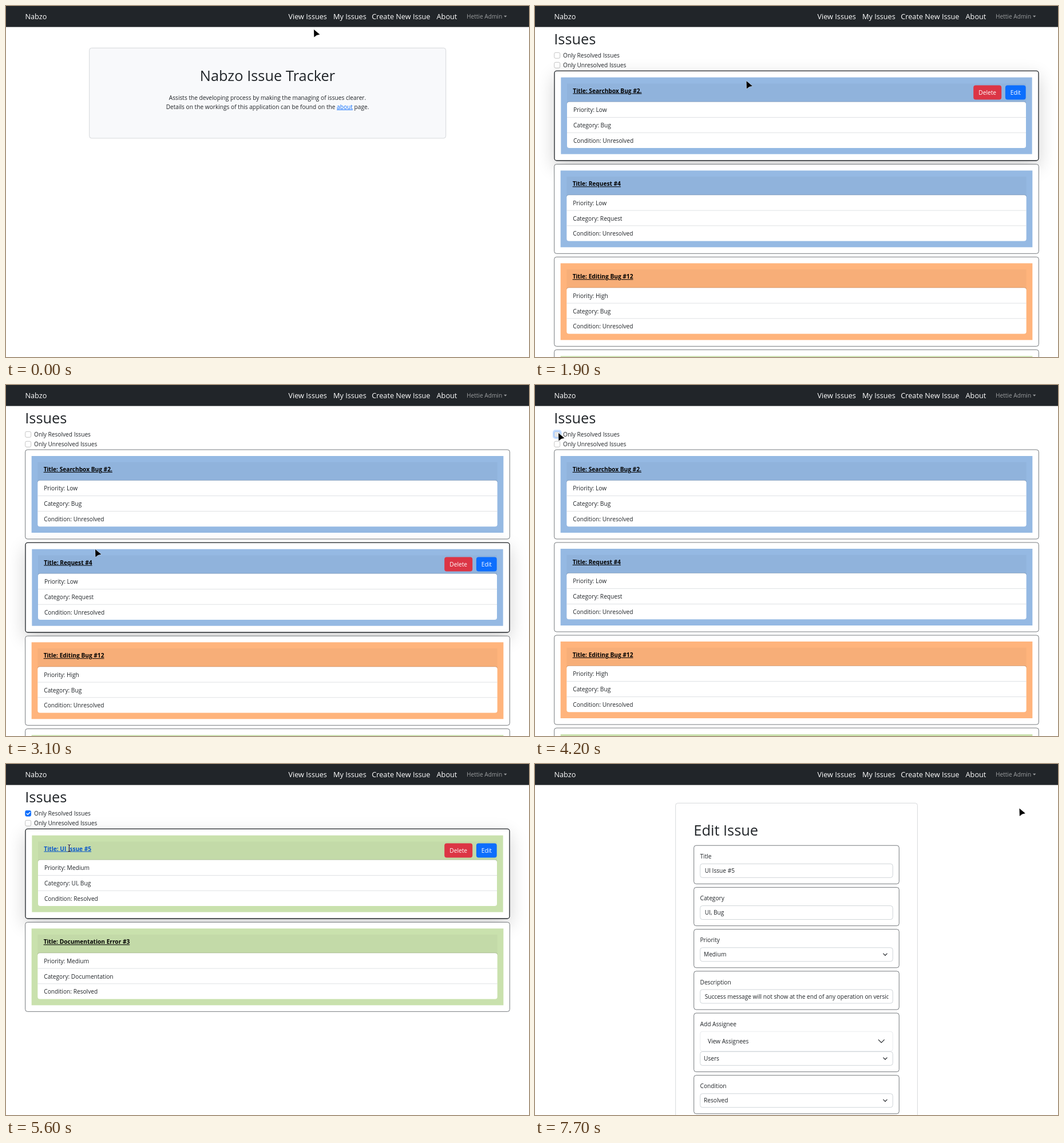
Animation of 914x613 px, one loop 8 s. Source, as an HTML page:

```html
<!DOCTYPE html>
<html lang="en">
<head>
<meta charset="utf-8">
<title>Issue tracker walkthrough</title>
<style>
  html, body { margin: 0; width: 100%; height: 100%; overflow: hidden; background: #fff; }
  svg { display: block; width: 914px; height: 613px; font-family: "Open Sans", "Noto Sans", sans-serif; }
  text { white-space: pre; }
</style>
</head>
<body>
<svg id="stage" viewBox="0 0 914 613" xmlns="http://www.w3.org/2000/svg"></svg>
<script>
const LOOP = 8000, STEP = 100;
const BODY = 10.17, NAV = 12.7, HEAD = 25.4;
const INK = '#212529', BLUE = '#0d6efd', EDGE = '#343a40', LINE = '#dee2e6';
const TINT = { Low: '#95b9e3', Medium: '#c9e1ad', High: '#ffb47c' };
const LEFT = 33.33, RIGHT = 880.67, FIRST = 112.67, PITCH = 162, ROW = 26.8;

const BRAND = 'Nabzo', USER = 'Hettie Admin';
const DEVS = ['Eric Dev', 'Bernard Dev'];
const MAILS = ['eric@dev.test', 'bernard@dev.test'];
const NOTE = 'Success message will not show at the end of any operation on version 1.2.9.';

const issue = (title, priority, category, condition) => ({ title, priority, category, condition });
const ISSUES = [
  issue('Searchbox Bug #2.', 'Low', 'Bug', 'Unresolved'),
  issue('Request #4', 'Low', 'Request', 'Unresolved'),
  issue('Editing Bug #12', 'High', 'Bug', 'Unresolved'),
  issue('UI Issue #5', 'Medium', 'UI, Bug', 'Resolved'),
  issue('Documentation Error #3', 'Medium', 'Documentation', 'Resolved')
];

// Pointer travel: start, end, from, to, easing, optional bend point
const smooth = u => u * u * (3 - 2 * u);
const settle = u => 1 - (1 - u) ** 2;
const linear = u => u;
const MOVES = [
  [200, 900, [538, 41], [537.5, 20], smooth],
  [1050, 1900, [537.5, 20], [369.5, 131], smooth],
  [1900, 2800, [369.5, 131], [185, 452], smooth, [300, 350]],
  [2900, 3100, [185, 452], [156, 287], linear],
  [3100, 3800, [156, 287], [42.5, 85], settle],
  [3800, 3900, [42.5, 85], [41, 84], linear],
  [4600, 5600, [41, 84], [110.5, 147], smooth],
  [6100, 7000, [110.5, 147], [799.5, 180.5], smooth, [480, 392]],
  [7000, 7600, [799.5, 180.5], [846.5, 77.5], smooth]
];

function pointerAt(t) {
  let pos = MOVES[0][2];
  for (const [t0, t1, a, b, ease, bend] of MOVES) {
    if (t < t0) break;
    const u = ease(Math.min(1, (t - t0) / (t1 - t0)));
    const c = bend || a.map((v, i) => (v + b[i]) / 2);
    pos = a.map((v, i) => (1 - u) ** 2 * v + 2 * u * (1 - u) * c[i] + u * u * b[i]);
  }
  return pos;
}

let mx, my, cursor;

const inside = (x, y, w, h) => mx >= x && mx <= x + w && my >= y && my <= y + h;
const attrs = o => Object.entries(o).map(([k, v]) => ` ${k}="${v}"`).join('');
const rect = (x, y, w, h, fill, more = {}) => `<rect${attrs({ x, y, width: w, height: h, fill, ...more })}/>`;
const path = (d, more) => `<path${attrs({ d, ...more })}/>`;
const text = (x, y, str, more = {}) => `<text${attrs({ x, y, 'font-size': BODY, fill: INK, ...more })}>${str}</text>`;
const heading = (x, y, str, more = {}) => text(x, y, str, { 'font-size': HEAD, 'font-weight': 500, ...more });

// Border drawn inside the box, like a CSS border
const frame = (x, y, w, h, stroke, line = .67, fill = '#fff') =>
  rect(x + line / 2, y + line / 2, w - line, h - line, fill, { rx: 4, stroke, 'stroke-width': line });

function selectable(x, y, str, more) {
  if (inside(x, y - 10, str.length * 4.9, 13)) cursor = 'beam';
  return text(x, y, str, more);
}

function button(x, y, w, label, fill, hoverFill) {
  const over = inside(x, y, w, 25);
  if (over) cursor = 'hand';
  return rect(x, y, w, 25, over ? hoverFill : fill, { rx: 4 }) +
    text(x + w / 2, y + 16.3, label, { fill: '#fff', 'text-anchor': 'middle' });
}

const buttons = (x, y) =>
  button(x, y, 49, 'Delete', '#dc3545', '#bb2d3b') +
  button(x + 55.7, y, 35.8, 'Edit', BLUE, '#0b5ed7');

function navbar() {
  const links = [[493.5, 'View Issues'], [572, 'My Issues'], [639.3, 'Create New Issue'], [752.6, 'About']];
  const white = { 'font-size': NAV, fill: '#fff' };
  return rect(0, 0, 914, 36.67, INK) +
    text(33.5, 23.3, BRAND, white) +
    links.map(([x, s]) => text(x, 23.3, s, white)).join('') +
    text(805, 22, USER, { fill: '#9b9d9f' }) +
    path('M870 16.8h5.4l-2.7 2.9z', { fill: '#9b9d9f' });
}

function statusBar() {
  if (!inside(488, 6, 79, 31)) return '';
  cursor = 'hand';
  return rect(-1, 598.5, 108, 16, '#dee1e6', { rx: 2.5, stroke: '#c4c7cc', 'stroke-width': .7 }) +
    text(5, 609, 'localhost:3000/issues', { 'font-size': 8.2, fill: '#4b4f54' });
}

function homePage() {
  const mid = { 'text-anchor': 'middle' };
  return frame(145.33, 73, 623.67, 158.3, '#c4c6c9', .67, '#f8f9fb') +
    heading(457, 131, BRAND + ' Issue Tracker', mid) +
    text(457, 164, 'Assists the developing process by making the managing of issues clearer.', mid) +
    text(457, 179.7, 'Details on the workings of this application can be found on the ' +
      `<tspan fill="${BLUE}" text-decoration="underline">about</tspan> page.`, mid);
}

function checkbox(y, label, state) {
  const pressed = state === 'pressed', checked = state === 'checked';
  const fill = checked ? BLUE : pressed ? '#e6e6e6' : '#fff';
  const stroke = checked ? BLUE : pressed ? '#86b7fe' : '#aaa';
  return (pressed ? rect(31, y - 2.67, 15.6, 15.6, BLUE, { rx: 4.5, opacity: .25 }) : '') +
    rect(33.67, y + .33, 10, 10, fill, { rx: 2.4, stroke, 'stroke-width': .67 }) +
    (checked ? path(`M36.2 ${y + 5.4}l1.9 1.9 3.7-3.7`,
      { fill: 'none', stroke: '#fff', 'stroke-width': 1.4, 'stroke-linecap': 'round', 'stroke-linejoin': 'round' }) : '') +
    text(49, y + 9, label);
}

function card(item, top, over) {
  const line = over ? 1.33 : .67, d = line - .67;
  const h = 156.67 + 2 * d, y = top + d, x = LEFT + d, w = RIGHT - LEFT;
  const title = 'Title: ' + item.title;
  const linked = inside(x + 32, y + 29, title.length * 4.9, 13);
  const rows = ['Priority: ' + item.priority, 'Category: ' + item.category, 'Condition: ' + item.condition];
  let out = over ? rect(LEFT, top + 10.67, w, h, '#000', { rx: 4, opacity: .175, filter: 'url(#blur)' }) : '';
  out += frame(LEFT, top, w, h, over ? INK : EDGE, line) +
    rect(x + 11.33, y + 11.33, w - 22.66 - 2 * d, 134, TINT[item.priority]) +
    rect(x + 22, y + 22, w - 44 - 2 * d, 36, '#000', { opacity: .03 }) +
    rect(x + 22, y + 53.4, w - 44 - 2 * d, 5, '#000', { opacity: .175, rx: 4 }) +
    rect(x + 22, y + 54.2, w - 44 - 2 * d, 80.4, '#fff', { rx: 4 }) +
    selectable(x + 32.3, y + 38.2, title,
      { 'font-weight': 700, fill: linked ? '#0a58ca' : '#000', 'text-decoration': 'underline' });
  rows.forEach((s, i) => {
    if (i) out += rect(x + 22, y + 53.9 + i * ROW, w - 44 - 2 * d, .67, '#cfd3d7');
    out += selectable(x + 32.9, y + 71.8 + i * ROW, s);
  });
  return out + (over ? buttons(766.2, y + 25.2) : '');
}

function listPage(t) {
  const filtered = t >= 4300;
  const items = filtered ? ISSUES.slice(3) : ISSUES.slice(0, 4);
  const state = filtered ? 'checked' : t >= 4100 ? 'pressed' : '';
  let top = FIRST;
  let out = heading(33.2, 67.3, 'Issues') +
    checkbox(81, 'Only Resolved Issues', state) + checkbox(98, 'Only Unresolved Issues', '');
  items.forEach((item, i) => {
    const over = inside(LEFT, FIRST + i * PITCH, RIGHT - LEFT, 157);
    out += card(item, top, over);
    top += PITCH + (over ? 1.33 : 0);
  });
  return out;
}

function detailPage() {
  const rows = ['Priority: Medium', 'Category: UI, Bug', 'Description: ' + NOTE, 'Condition: Resolved',
    'Assigned to:', ...DEVS.map((n, i) => `${n} - ${MAILS[i]}`), 'Comments:',
    `[2023/06/28 - 14:32:17] ${DEVS[1]}: Should be reassigned to another dev, I'm already working on two other issues.`,
    `[2023/06/28 - 15:02:19] ${DEVS[0]}: I had some free time, so I fixed it already.`];
  const x = 44.67, w = 824.66, top = 85.6;
  let out = rect(LEFT, 42, RIGHT - LEFT, 322, TINT.Medium, { rx: 4 }) +
    rect(x, 53, w, top - 53, '#000', { opacity: .03 }) +
    selectable(55, 70, 'Title: UI Issue #5', { 'font-weight': 700 });
  rows.forEach((s, i) => {
    const y = top + i * ROW, grey = [5, 6, 8, 9].includes(i);
    out += rect(x, y, w, ROW, grey ? '#d3d3d3' : '#fff') +
      rect(x, y - .33, w, .67, grey || !i ? '#a9adab' : '#cfd3d7') +
      selectable(55, y + 17.2, s);
  });
  return out + buttons(771.6, 57);
}

const chevron = (x, y, r) => path(`M${x - r} ${y - r / 2}l${r} ${r} ${r} ${-r}`,
  { fill: 'none', stroke: INK, 'stroke-width': 1.2, 'stroke-linecap': 'round', 'stroke-linejoin': 'round' });

function field(y, value, select) {
  return frame(288.3, y, 337.3, 24.7, '#b9c0c7') +
    text(select ? 295 : 296.7, y + 16, value, { 'clip-path': 'url(#field)' }) +
    (select ? chevron(612, y + 12.4, 3.2) : '');
}

const section = (y, h, label) => frame(277.33, y, 359.3, h, EDGE) + text(288.5, y + 23, label);

function editPage() {
  const fields = [['Title', 'UI Issue #5'], ['Category', 'UI, Bug'], ['Priority', 'Medium', true], ['Description', NOTE]];
  let out = frame(245.33, 68, 423.4, 600, '#c4c6c9') + heading(277.3, 125.3, 'Edit Issue');
  fields.forEach(([label, value, select], i) => {
    const y = 141.9 + i * 73.2;
    out += section(y, 67.8, label) + field(y + 32.1, value, select);
  });
  return out + section(434.7, 103.2, 'Add Assignee') +
    frame(288.3, 466.8, 337.3, 35, LINE) + text(302, 488, 'View Assignees') + chevron(605.3, 484.2, 5) +
    field(502, 'Users', true) +
    section(543.3, 67.8, 'Condition') + field(575.4, 'Resolved', true);
}

const SHAPES = {
  arrow: path('M0 0L10.4 8.8 5 9.9.4 13.6z', { fill: '#000', stroke: '#fff', 'stroke-width': .7, 'paint-order': 'stroke' }),
  beam: ['#fff', '#000'].map((stroke, i) => path('M-2.6-6.2Q-.3-6.2 0-5 .3-6.2 2.6-6.2M0-5V5M-2.6 6.2Q-.3 6.2 0 5 .3 6.2 2.6 6.2',
    { fill: 'none', stroke, 'stroke-width': i ? 1.1 : 2.4 })).join(''),
  hand: path('M-1 1Q0-.6 1 1V5L5.6 6Q7 6.5 6.8 8L6 12.5H-.6L-4 8.4Q-3.6 6.8-2 7.8L-1 8.6z',
    { fill: '#000', stroke: '#fff', 'stroke-width': .7 })
};

const DEFS = '<defs><filter id="blur" x="-20%" y="-60%" width="140%" height="220%">' +
  '<feGaussianBlur stdDeviation="16"/></filter>' +
  '<clipPath id="field"><rect x="289" y="0" width="328.6" height="613"/></clipPath></defs>';

function pageAt(t) {
  if (t < 1100) return homePage();
  if (t < 5700) return listPage(t);
  return t < 7700 ? detailPage() : editPage();
}

const stage = document.getElementById('stage');
let shown = -1;

function draw(now) {
  const t = Math.floor(now % LOOP / STEP) * STEP;
  if (t !== shown) {
    shown = t;
    [mx, my] = pointerAt(t);
    cursor = 'arrow';
    stage.innerHTML = DEFS + rect(0, 0, 914, 613, '#fff') + pageAt(t) + navbar() + statusBar() +
      `<g transform="translate(${mx} ${my})">${SHAPES[cursor]}</g>`;
  }
  requestAnimationFrame(draw);
}

const start = performance.now();
draw(0);
requestAnimationFrame(function tick() {
  draw = now => {};
  const loop = () => { render(performance.now() - start); requestAnimationFrame(loop); };
  loop();
});

function render(now) {
  const t = Math.floor(now % LOOP / STEP) * STEP;
  if (t === shown) return;
  shown = t;
  [mx, my] = pointerAt(t);
  cursor = 'arrow';
  stage.innerHTML = DEFS + rect(0, 0, 914, 613, '#fff') + pageAt(t) + navbar() + statusBar() +
    `<g transform="translate(${mx} ${my})">${SHAPES[cursor]}</g>`;
}
</script>
</body>
</html>
```
